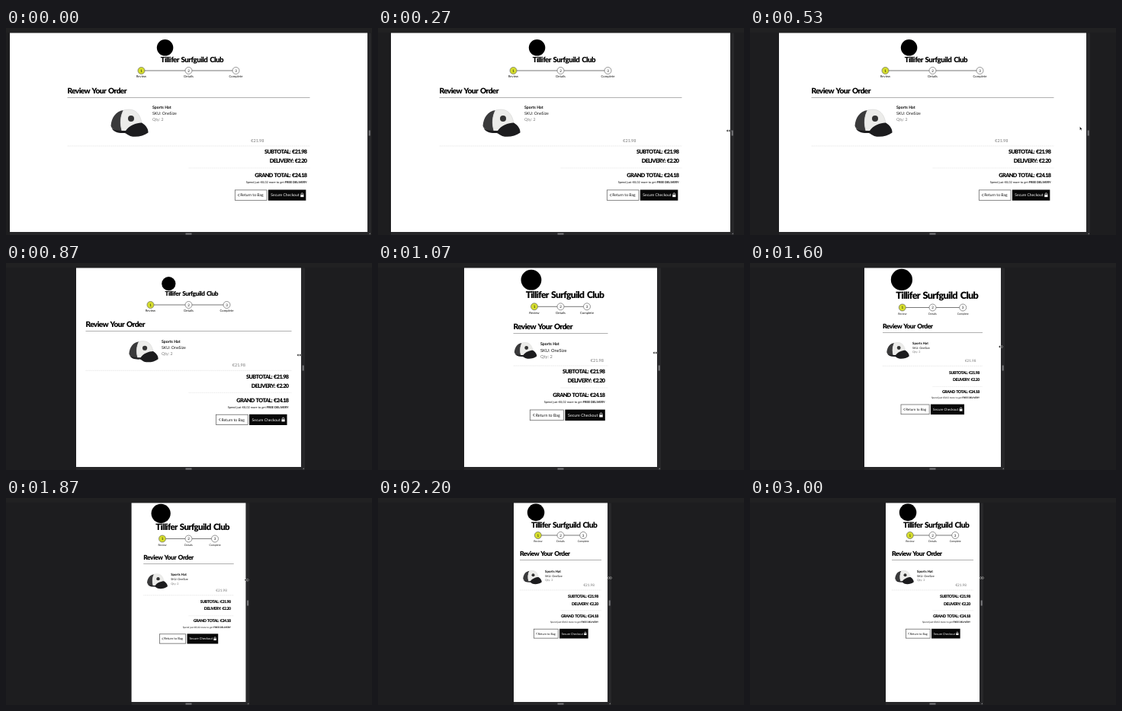
Write an HTML page that moves like this. It is 480x272 px and loops after 3070 ms.

```html
<!DOCTYPE html>
<html lang="en">
<head>
<meta charset="utf-8">
<title>Responsive checkout</title>
<style>
  html, body { margin: 0; width: 100%; height: 100%; overflow: hidden; background: #1d1d1f; }
  svg { display: block; width: 480px; height: 272px; }
  text { font-family: Lato, sans-serif; fill: #111; text-rendering: geometricPrecision; }
  .display { font-weight: 900; letter-spacing: -.055em; word-spacing: .12em; fill: #000; }
  .sum { letter-spacing: -.08em; }
  .bold { font-weight: 700; fill: #000; }
  .gray { fill: #777; }
  .mid { text-anchor: middle; }
  .end { text-anchor: end; }
  .light { fill: #fff; }
  .ring { fill: #fff; stroke: #666; stroke-width: .7; }
  .on { fill: #d6de2c; }
</style>
</head>
<body>
<svg viewBox="0 0 480 272">
  <rect width="480" height="272" fill="#1d1d1f"/>
  <rect width="480" height="6" fill="#212122"/>
  <rect id="frame" y="6.5" height="265.5" fill="#272729"/>
  <rect id="page" y="6.5" height="261.5" fill="#fff"/>
  <rect id="gripX" y="134.5" width="2" height="7" fill="#77777a"/>
  <path id="corner" d="M0 2L2 0V2Z" fill="#77777a"/>
  <rect x="235.5" y="269.5" width="8" height="2" fill="#77777a"/>

  <circle id="mark" fill="#000"/>
  <text id="club" class="display end">Tillifer Surfguild Club</text>

  <path id="track" stroke="#555" stroke-width=".8"/>
  <g id="step0"><circle class="ring on" r="4.5"/><text class="mid" y="1.6" font-size="4.6">1</text><text class="mid label" y="9.3">Review</text></g>
  <g id="step1"><circle class="ring" r="4.5"/><text class="mid" y="1.6" font-size="4.6">2</text><text class="mid label" y="9.3">Details</text></g>
  <g id="step2"><circle class="ring" r="4.5"/><text class="mid" y="1.6" font-size="4.6">3</text><text class="mid label" y="9.3">Complete</text></g>

  <text id="title" class="display">Review Your Order</text>
  <path id="rule" stroke="#b0b0b0"/>

  <g id="hat">
    <path d="M1 44C3 22 14 6 34 3C26 18 24 38 30 58C18 60 4 55 1 44Z" fill="#3a3a3b"/>
    <path d="M34 3C60-3 76 6 82 36C66 38 48 46 40 58L30 57C24 38 26 18 34 3Z" fill="#ececea" stroke="#ccc"/>
    <circle cx="54" cy="25" r="8" fill="#333"/>
    <path d="M3 50C12 57 24 57 40 57C48 44 68 36 82 36C92 42 100 52 99 62C86 72 66 75 52 71C45 68 42 64 38 63C20 64 8 60 3 50Z" fill="#1c1c1e"/>
  </g>
  <text id="name" class="bold">Sports Hat</text>
  <text id="sku">SKU: OneSize</text>
  <text id="qty" class="gray">Qty: 2</text>
  <text id="price" class="gray end">€21.98</text>
  <path id="line1" stroke="#ddd" stroke-width=".7" stroke-dasharray="1 .6"/>

  <text id="subtotal" class="display sum end">SUBTOTAL: €21.98</text>
  <text id="delivery" class="display sum end">DELIVERY: €2.20</text>
  <path id="line2" stroke="#e2e2e2" stroke-width=".7" stroke-dasharray="1 .6"/>
  <text id="grand" class="display sum end">GRAND TOTAL: €24.18</text>
  <text id="note" class="end">Spend just €8,02 more to get <tspan class="bold">FREE DELIVERY</tspan></text>

  <rect id="back" fill="#fff" stroke="#555" stroke-width=".7"/>
  <path id="chevron" d="M.3-.35L0 0L.3.35" fill="none" stroke="#111" stroke-width=".15"/>
  <text id="backText">Return to Bag</text>
  <rect id="pay" fill="#080808"/>
  <text id="payText" class="light">Secure Checkout</text>
  <g id="lock"><rect x="-.42" y="-.1" width=".84" height=".6" fill="#fff"/><path d="M-.25-.1V-.3A.25.25 0 0 1 .25-.3V-.1" fill="none" stroke="#fff" stroke-width=".15"/></g>

  <g id="cursor" stroke="#fff" stroke-width=".4">
    <path id="arrow" d="M-1-2.5V2.2L.1 1.2L.9 2.8L1.6 2.4L.9 1H2.2Z"/>
    <path id="resize" d="M-3 0L-1-1.7V-.5H1V-1.7L3 0L1 1.7V.5H-1V1.7Z"/>
  </g>
</svg>
<script>
const LOOP = 3070, STEP = 200 / 3, LAST = 33, MID = 239.5;

// step, left edge of the page
const edge = [[0, 5], [4, 17], [8, 38], [13, 92], [16, 113], [20, 130], [24, 150], [32, 177.5], [33, 178]];
// step, pointer offset from the right edge, pointer height
const pointer = [[0, 3, 138], [8, -7.5, 132], [13, -2.5, 121], [20, -2.5, 114], [24, 0, 110], [33, 3, 105]];

// columns: large, medium, small, wide phone, narrow phone
const spec = {
  half:   [159, 135, 62, 65.5, 53.5],
  logo:   [45.5, 38.5, 56.7, 59.7, 47.7],
  logoY:  [44.5, 43, 45.5, 46.5, 38.5],
  gap:    [62, 50, 34.5, 39.7, 29.7],
  stepY:  [56, 55, 57.3, 58.5, 49],
  titleY: [86, 84, 87, 85.5, 76],
  hatX:   [137, 161, 178.5, 179, 190],
  hatY:   [106.5, 102, 104, 104, 95],
  hatW:   [50, 39, 30, 30, 25],
  itemX:  [192, 204, 213, 213, 219],
  itemY:  [106.2, 104.8, 108, 106.8, 98],
  body:   [5.25, 5.25, 5.7, 3.75, 3.75],
  priceX: [338.5, 314, 296, 296.5, 284],
  priceY: [150, 136.3, 130, 130.3, 116],
  sumY:   [165, 152, 145, 145.5, 131],
  sumGap: [12, 11.7, 11.7, 9.6, 9.5],
  grandY: [196, 182.5, 176, 171, 156.5],
  small:  [1, 1, 1, .72, .72],
  btnX:   [300.3, 275.5, 199.3, 198, 204.5],
  btnY:   [212.9, 199.2, 193, 186, 172.2],
  btn:    [5, 5, 5.3, 4.45, 3.8]
};

const $ = id => document.getElementById(id);
const put = (id, attrs) => { for (const a in attrs) $(id).setAttribute(a, attrs[a]); };
const type = (id, x, y, size) => put(id, { x, y, 'font-size': size });
const hline = (id, x1, x2, y) => put(id, { d: `M${x1} ${y}H${x2}` });
const at = (id, x, y, scale = 1) => put(id, { transform: `translate(${x} ${y}) scale(${scale})` });
const mix = (a, b, f) => a + (b - a) * f;

function segment(points, k) {
  let i = 0;
  while (i < points.length - 2 && k >= points[i + 1][0]) i++;
  return [i, (k - points[i][0]) / (points[i + 1][0] - points[i][0])];
}

function linear(points, k, col) {
  const [i, f] = segment(points, k);
  return mix(points[i][col], points[i + 1][col], f);
}

function smooth(points, k) {
  const [i, f] = segment(points, k);
  const slope = j => {
    const a = points[Math.max(j - 1, 0)], b = points[Math.min(j + 1, points.length - 1)];
    return (b[1] - a[1]) / (b[0] - a[0]);
  };
  const [x0, y0] = points[i], [x1, y1] = points[i + 1], h = x1 - x0, g = 1 - f;
  return y0 * (1 + 2 * f) * g * g + y1 * f * f * (3 - 2 * f)
    + h * f * g * (slope(i) * g - slope(i + 1) * f);
}

function layout(width) {
  const col = width >= 335 ? 0 : width >= 277 ? 1 : width >= 214.5 ? 2 : 3;
  const f = col === 3 ? (179 - width) / 56 : 0;
  const out = {};
  for (const key in spec) out[key] = f ? mix(spec[key][3], spec[key][4], f) : spec[key][col];
  return out;
}

function drawWindow(k, left, right) {
  put('frame', { x: left, width: right - left + 5 });
  put('page', { x: left, width: right - left });
  put('gripX', { x: right + 1.7 });
  at('corner', right + 2, 269);
  const dx = linear(pointer, k, 1), pushing = dx < -5;
  at('cursor', right + dx, linear(pointer, k, 2));
  put('cursor', { visibility: k ? 'visible' : 'hidden' });
  put('arrow', { display: pushing ? 'inline' : 'none' });
  put('resize', { display: pushing ? 'none' : 'inline' });
}

function drawHeader(p, left, right) {
  const w = p.logo * 1.75, x = MID + p.logo;
  put('mark', { cx: x - w * .96, cy: p.logoY - w * .235, r: w * .135 });
  type('club', x, p.logoY, w * .122);

  hline('track', MID - p.gap, MID + p.gap, p.stepY);
  const size = 4.2 * Math.sqrt(p.small);
  for (let i = 0; i < 3; i++) at('step' + i, MID + (i - 1) * p.gap, p.stepY);
  document.querySelectorAll('.label').forEach(el => el.setAttribute('font-size', size));

  type('title', left, p.titleY, 10 * Math.sqrt(p.small));
  hline('rule', left, right, Math.floor(p.titleY + 5.5) + .5);
}

function drawItem(p, left, right) {
  const line = p.body * 1.53;
  at('hat', p.hatX, p.hatY, p.hatW / 100);
  type('name', p.itemX, p.itemY, 5.2 * Math.sqrt(p.small));
  type('sku', p.itemX, p.itemY + line, p.body);
  type('qty', p.itemX, p.itemY + line * 2, p.body);
  type('price', p.priceX, p.priceY, 5.5 * Math.sqrt(p.small));
  hline('line1', left, right, p.priceY + 5);
}

function drawTotals(p, right) {
  const x = right - 4, size = 7.3 * p.small;
  type('subtotal', x, p.sumY, size);
  type('delivery', x, p.sumY + p.sumGap, size);
  hline('line2', right - p.half, right, p.grandY - 12 * p.small);
  type('grand', x, p.grandY, size);
  type('note', x, p.grandY + 8.4 * Math.sqrt(p.small), 1 + 2.95 * p.small);
}

function drawButtons(p) {
  const s = p.btn, w = s * 8.35, height = 7.4 + s * 1.2;
  const x2 = p.btnX + w + 1.8, cy = p.btnY + height / 2, base = cy + s * .35;
  put('back', { x: p.btnX, y: p.btnY, width: w, height });
  at('chevron', p.btnX + s * .8, cy, s);
  type('backText', p.btnX + s * 1.4, base, s);
  put('pay', { x: x2, y: p.btnY - .4, width: s * 9.9, height: height + .8 });
  type('payText', x2 + s * .7, base, s);
  at('lock', x2 + s * 8.9, cy, s);
}

function draw(k) {
  const left = smooth(edge, k), right = MID * 2 - left;
  const p = layout(right - left);
  const x1 = MID - p.half, x2 = MID + p.half;
  drawWindow(k, left, right);
  drawHeader(p, x1, x2);
  drawItem(p, x1, x2);
  drawTotals(p, x2);
  drawButtons(p);
}

// Steps run at 15 per second, rounded to 10 ms.
function stepAt(t) {
  const k = Math.floor((t + 5) / STEP);
  return Math.min(LAST, Math.round(k * STEP / 10) * 10 > t ? k - 1 : k);
}

const start = performance.now();
let shown = -1;
function tick() {
  const k = stepAt((performance.now() - start) % LOOP);
  if (k !== shown) draw(shown = k);
  requestAnimationFrame(tick);
}
tick();
</script>
</body>
</html>
```
